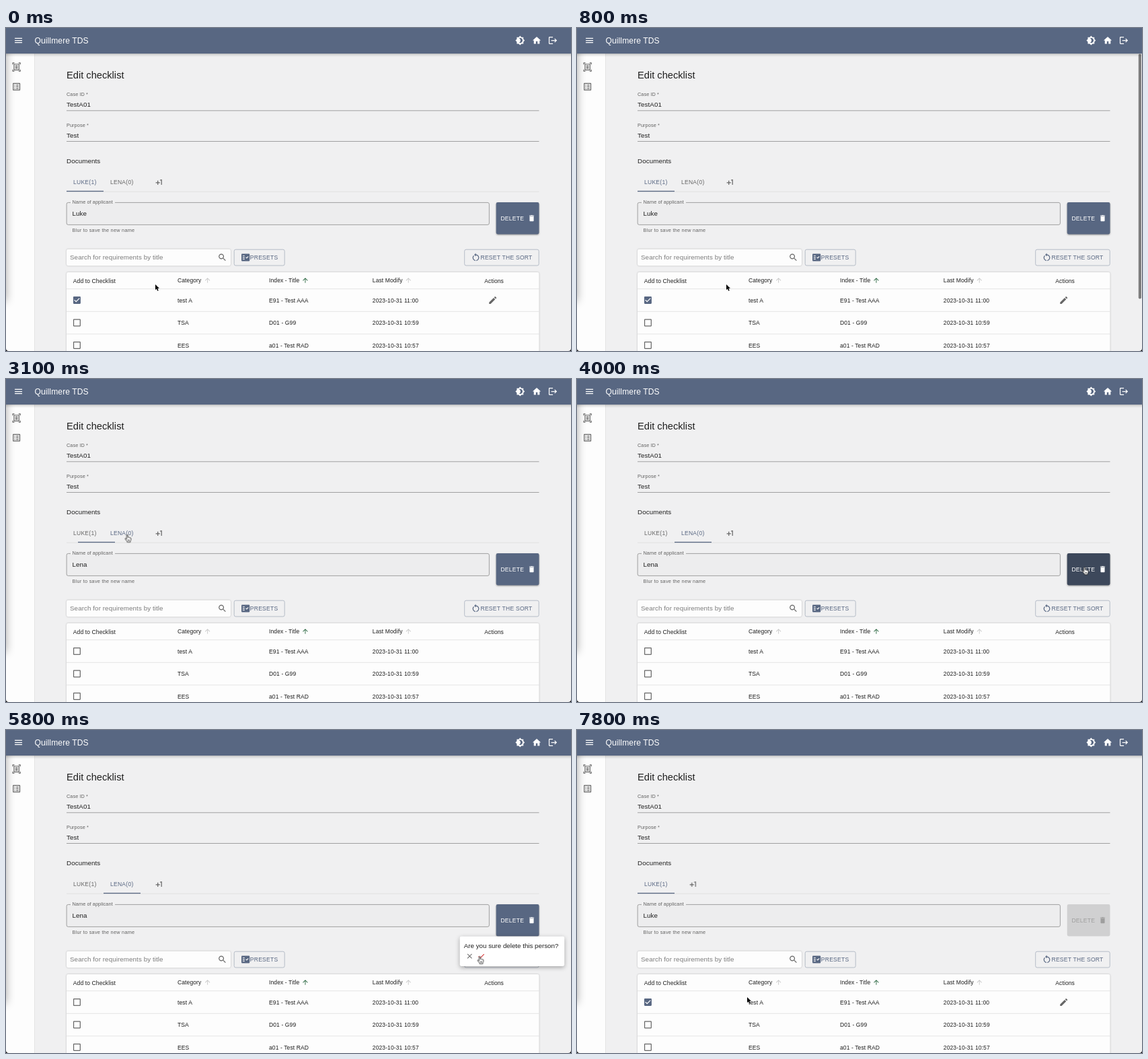
Write an HTML page that moves like this. It is 840 px wide and 480 px high and loops after 8 s.

```html
<!DOCTYPE html>
<html lang="en">
<head>
<meta charset="utf-8">
<title>Edit checklist</title>
<style>
  html, body { margin: 0; width: 100%; height: 100%; overflow: hidden; background: #f0f0f1; }
  svg { display: block; width: 840px; height: 480px; }
  text { font: 9.78px "Liberation Sans", Arial, sans-serif; letter-spacing: .00938em; fill: #1f1f1f; white-space: pre; }
  .h5 text, text.h5 { font-size: 14.67px; letter-spacing: 0; }
  .lab text, text.lab { font-size: 7.33px; fill: #636363; }
  text.help { font-size: 7.33px; letter-spacing: .0333em; fill: #636363; }
  .cell text { font-size: 8.555px; letter-spacing: .0107em; }
  .btn text { font-size: 8.555px; letter-spacing: .02857em; fill: inherit; }
  .blue { fill: #586782; }
  .gray { fill: #666; }
  .white { fill: #fff; }
  .line { stroke: #8c8c8c; stroke-width: .8; fill: none; }
  .rule { stroke: #dfdfdf; stroke-width: .8; }
  .outlined { fill: none; stroke: #a6afbd; stroke-width: .8; }
  .sh1 { filter: drop-shadow(0 .7px .8px rgba(0,0,0,.26)); }
  .sh2 { filter: drop-shadow(0 1px 1.3px rgba(0,0,0,.38)); }
  .sh8 { filter: drop-shadow(0 2px 3px rgba(0,0,0,.32)); }

  /* 8 s loop, 100 ms = 1.25% */
  .scroll, .bar, .thumb, .first, .second, .early, .late, .tab1, .tab2, .ink, .del, .pop, .arrow, .hand {
    animation: 8s step-end infinite;
  }
  .scroll { animation-name: scroll; }
  .bar { animation-name: bar; }
  .thumb { animation-name: thumb; }
  .first { animation-name: first; }
  .second { animation-name: second; }
  .early { animation-name: early; }
  .late { animation-name: late; }
  .tab1 { animation-name: tab1; }
  .tab2 { animation-name: tab2; }
  .ink { animation-name: ink; }
  .del { animation-name: del; }
  .pop { animation-name: pop; }
  .arrow { animation-name: arrow; }
  .hand { animation-name: hand; }
  .cursor { animation: move 8s infinite; }

  @keyframes scroll {
    0% { transform: none; }
    1.25% { transform: translateY(-1px); }
    3.75% { transform: translateY(-6px); }
    5% { transform: translateY(-10px); }
    7.5% { transform: translateY(-5.5px); }
    8.75% { transform: translateY(-2px); }
    10%, 100% { transform: none; }
  }
  @keyframes thumb {
    0% { transform: none; }
    1.25% { transform: translateY(.8px); }
    3.75% { transform: translateY(5px); }
    5% { transform: translateY(8.3px); }
    7.5% { transform: translateY(4.6px); }
    8.75% { transform: translateY(1.7px); }
    10%, 100% { transform: none; }
  }
  @keyframes bar {
    0% { opacity: 0; }
    1.25% { opacity: 1; }
    17.5% { opacity: .5; }
    18.75% { opacity: .08; }
    20%, 100% { opacity: 0; }
  }
  @keyframes first { 0% { opacity: 1; } 38.75% { opacity: 0; } 76.25%, 100% { opacity: 1; } }
  @keyframes second { 0% { opacity: 0; } 38.75% { opacity: 1; } 76.25%, 100% { opacity: 0; } }
  @keyframes early { 0% { opacity: 1; } 76.25%, 100% { opacity: 0; } }
  @keyframes late { 0% { opacity: 0; } 76.25%, 100% { opacity: 1; } }
  @keyframes tab1 { 0% { fill: #586782; } 38.75% { fill: #666; } 76.25%, 100% { fill: #586782; } }
  @keyframes tab2 { 0% { fill: #666; } 38.75%, 100% { fill: #586782; } }
  @keyframes ink {
    0% { transform: none; }
    38.75% { transform: translateX(17px); }
    40% { transform: translateX(46px); }
    41.25% { transform: translateX(54px); }
    42.5% { transform: translateX(55px); }
    76.25% { transform: translateX(38px); }
    77.5% { transform: translateX(9px); }
    78.75% { transform: translateX(1px); }
    80%, 100% { transform: none; }
  }
  @keyframes del {
    0% { fill: #586782; }
    47.5% { fill: #4a576e; }
    48.75% { fill: #3d485b; }
    53.75% { fill: #4a576e; }
    55%, 100% { fill: #586782; }
  }
  @keyframes pop {
    0% { opacity: 0; }
    53.75% { opacity: .35; }
    55% { opacity: .85; }
    56.25% { opacity: 1; }
    76.25% { opacity: .5; }
    77.5% { opacity: .1; }
    78.75%, 100% { opacity: 0; }
  }
  @keyframes hand {
    0% { opacity: 0; } 30% { opacity: 1; } 42.5% { opacity: 0; } 47.5% { opacity: 1; }
    53.75% { opacity: 0; } 71.25% { opacity: 1; } 81.25%, 100% { opacity: 0; }
  }
  @keyframes arrow {
    0% { opacity: 1; } 30% { opacity: 0; } 42.5% { opacity: 1; } 47.5% { opacity: 0; }
    53.75% { opacity: 1; } 71.25% { opacity: 0; } 81.25%, 100% { opacity: 1; }
  }
  @keyframes move {
    0% { transform: translate(222px, 381px); animation-timing-function: step-end; }
    16.25% { transform: translate(222px, 381px); animation-timing-function: steps(2); }
    18.75% { transform: translate(212px, 363px); animation-timing-function: steps(3); }
    22.5% { transform: translate(168px, 319px); animation-timing-function: step-end; }
    25% { transform: translate(168px, 319px); animation-timing-function: steps(4); }
    30% { transform: translate(207px, 233px); animation-timing-function: step-end; }
    31.25% { transform: translate(207px, 233px); animation-timing-function: steps(3); }
    35% { transform: translate(180.5px, 231.5px); animation-timing-function: step-end; }
    38.75% { transform: translate(180.5px, 231.5px); animation-timing-function: steps(2); }
    41.25% { transform: translate(225px, 237px); animation-timing-function: steps(3); }
    45% { transform: translate(600px, 276px); animation-timing-function: steps(3); }
    48.75% { transform: translate(764px, 290px); animation-timing-function: steps(2); }
    51.25% { transform: translate(745.5px, 269.5px); animation-timing-function: step-end; }
    61.25% { transform: translate(745.5px, 269.5px); animation-timing-function: steps(9); }
    72.5% { transform: translate(704.5px, 336.5px); animation-timing-function: step-end; }
    80% { transform: translate(704.5px, 336.5px); animation-timing-function: steps(4); }
    85% { transform: translate(560px, 352px); animation-timing-function: step-end; }
    86.25% { transform: translate(560px, 352px); animation-timing-function: steps(9); }
    97.5%, 100% { transform: translate(253px, 397px); }
  }
</style>
</head>
<body>
<svg viewBox="0 0 840 480">
  <defs>
    <path id="up" d="M4 12l1.41 1.41L11 7.83V20h2V7.83l5.58 5.59L20 12l-8-8z" transform="scale(.47)"/>
    <path id="box" d="M19 5v14H5V5h14m0-2H5c-1.1 0-2 .9-2 2v14c0 1.1.9 2 2 2h14c1.1 0 2-.9 2-2V5c0-1.1-.9-2-2-2z" transform="scale(.611)"/>
    <path id="plus" d="M10 8H8v4H4v2h4v4h2v-4h4v-2h-4zm4.5-1.92V7.9l2.5-.5V18h2V5z" transform="scale(.611)"/>
    <path id="bin" d="M6 19c0 1.1.9 2 2 2h8c1.1 0 2-.9 2-2V7H6zM19 4h-3.5l-1-1h-5l-1 1H5v2h14z" transform="scale(.509)"/>
    <filter id="blur" x="-300%" y="-20%" width="700%" height="140%"><feGaussianBlur stdDeviation="7"/></filter>
  </defs>

  <rect width="840" height="480" fill="#f0f0f1"/>

  <g class="scroll">
    <text class="h5" x="90" y="74.7">Edit checklist</text>
    <g class="lab">
      <text x="90" y="101.2">Case ID *</text>
      <text x="90" y="147">Purpose *</text>
    </g>
    <text x="90" y="116.8">TestA01</text>
    <text x="90" y="162.5">Test</text>
    <path class="line" d="M90 122.8H792.5M90 168.5H792.5"/>
    <text x="90" y="201.3">Documents</text>

    <path class="rule" d="M90 243.3H792.5"/>
    <g class="btn">
      <g class="tab1"><text x="100" y="232.1">LUKE(1)</text></g>
      <g class="early">
        <g class="tab2"><text x="155" y="232.1">LENA(0)</text></g>
        <use href="#plus" x="220.2" y="221.9" class="gray"/>
      </g>
      <use href="#plus" x="165.2" y="221.9" class="gray late"/>
    </g>
    <rect class="ink blue" x="90" y="241.9" width="55" height="1.3"/>

    <rect x="90" y="259.4" width="628.5" height="33" rx="2.4" fill="#ededee"/>
    <path class="line" d="M96 259.4H92.5a2.4 2.4 0 0 0-2.4 2.4V290a2.4 2.4 0 0 0 2.4 2.4H716a2.4 2.4 0 0 0 2.4-2.4V261.8a2.4 2.4 0 0 0-2.4-2.4H162"/>
    <text class="lab" x="98.5" y="261.3">Name of applicant</text>
    <text class="first" x="98.5" y="279.3">Luke</text>
    <text class="second" x="98.5" y="279.3">Lena</text>
    <text class="help" x="98.5" y="302.9">Blur to save the new name</text>

    <g class="early btn white">
      <rect class="del sh2" x="728.7" y="259" width="63.8" height="47.5" rx="2.4"/>
      <text x="735.4" y="285.6">DELETE</text>
      <use href="#bin" x="775.4" y="276.5"/>
    </g>
    <g class="late btn" fill="#9e9e9e">
      <rect x="728.7" y="259" width="63.8" height="47.5" rx="2.4" fill="#d0d0d1"/>
      <text x="735.4" y="285.6">DELETE</text>
      <use href="#bin" x="775.4" y="276.5"/>
    </g>

    <rect class="sh1" x="90" y="328.8" width="244" height="24.4" rx="2.4" fill="#fdfdfd"/>
    <text x="95" y="344.2" style="fill:#7c7c7c">Search for requirements by title</text>
    <path class="gray" transform="translate(314.3 333.6) scale(.611)" d="M15.5 14h-.79l-.28-.27C15.41 12.59 16 11.11 16 9.5 16 5.91 13.09 3 9.5 3S3 5.91 3 9.5 5.91 16 9.5 16c1.61 0 3.09-.59 4.23-1.57l.27.28v.79l5 4.99L20.49 19zm-6 0C7.01 14 5 11.99 5 9.5S7.01 5 9.5 5 14 7.01 14 9.5 11.99 14 9.5 14z"/>
    <g class="btn blue">
      <rect class="outlined" x="339.2" y="329.2" width="75" height="23.8" rx="2.4"/>
      <path fill-rule="evenodd" transform="translate(348.8 333.6) scale(.611)" d="M20 3H4c-1.1 0-2 .9-2 2v14c0 1.1.9 2 2 2h16c1.1 0 2-.9 2-2V5c0-1.1-.9-2-2-2zM10 17H5v-2h5zm0-4H5v-2h5zm0-4H5V7h5zm4.82 6L12 12.16l1.41-1.41 1.41 1.42L17.99 9l1.42 1.42z"/>
      <text x="362.8" y="344">PRESETS</text>
      <rect class="outlined" x="681.7" y="329.2" width="110.5" height="23.8" rx="2.4"/>
      <path transform="translate(691.2 333.4) scale(.611)" d="M12 5V2L8 6l4 4V7c3.31 0 6 2.69 6 6 0 2.97-2.17 5.43-5 5.91v2.02c3.95-.49 7-3.85 7-7.93 0-4.42-3.58-8-8-8zM6 13c0-1.65.67-3.15 1.76-4.24L6.34 7.34C4.9 8.79 4 10.79 4 13c0 4.08 3.05 7.44 7 7.93v-2.02c-2.83-.48-5-2.94-5-5.91z"/>
      <text x="705.5" y="344">RESET THE SORT</text>
    </g>

    <rect class="sh1" x="90" y="363" width="702.5" height="150" rx="2.4" fill="#fdfdfd"/>
    <path class="rule" d="M90 387.7H792.5M90 421.3H792.5M90 454.8H792.5M90 488.4H792.5"/>
    <g class="cell">
      <text x="99.8" y="378.8">Add to Checklist</text>
      <text x="255" y="377.8">Category</text>
      <text x="391" y="377.8">Index - Title</text>
      <text x="544.8" y="377.8">Last Modify</text>
      <text x="711.3" y="378.8">Actions</text>
      <text x="255" y="407.7">test A</text>
      <text x="391" y="407.7">E91 - Test AAA</text>
      <text x="544.8" y="407.7">2023-10-31 11:00</text>
      <text x="255" y="441.1">TSA</text>
      <text x="391" y="441.1">D01 - G99</text>
      <text x="544.8" y="441.1">2023-10-31 10:59</text>
      <text x="255" y="474.7">EES</text>
      <text x="391" y="474.7">a01 - Test RAD</text>
      <text x="544.8" y="474.7">2023-10-31 10:57</text>
    </g>
    <use href="#up" x="294" y="369.4" fill="#cacaca"/>
    <use href="#up" x="439.3" y="369.4" fill="#2f6b45"/>
    <use href="#up" x="592.6" y="369.4" fill="#cacaca"/>
    <g class="first">
      <path class="blue" transform="translate(98.1 397.2) scale(.611)" d="M19 3H5c-1.11 0-2 .9-2 2v14c0 1.1.89 2 2 2h14c1.11 0 2-.9 2-2V5c0-1.1-.89-2-2-2zm-9 14l-5-5 1.41-1.41L10 14.17l7.59-7.59L19 8z"/>
      <path class="gray" transform="translate(716.4 397.2) scale(.611)" d="M3 17.25V21h3.75L17.81 9.94l-3.75-3.75zM20.71 7.04c.39-.39.39-1.02 0-1.41l-2.34-2.34a1 1 0 0 0-1.41 0l-1.83 1.83 3.75 3.75z"/>
    </g>
    <use href="#box" x="98.1" y="397.2" class="gray second"/>
    <use href="#box" x="98.1" y="430.6" class="gray"/>
    <use href="#box" x="98.1" y="464.2" class="gray"/>
  </g>

  <g class="bar"><rect class="thumb" x="834.8" y="38.5" width="4.2" height="364" rx="2.1" fill="#7d7d7d"/></g>

  <rect y="38" width="42.5" height="442" fill="#fdfdfd"/>
  <path d="M42.6 38V480" stroke="#dcdcdc" stroke-width=".8"/>
  <rect x="-30" y="20" width="30" height="386" opacity=".34" filter="url(#blur)"/>
  <g class="gray">
    <path fill-rule="evenodd" transform="translate(8.3 50.7) scale(.611)" d="M7 3H4v3H2V1h5zm15 3V1h-5v2h3v3zM7 21H4v-3H2v5h5zm13-3v3h-3v2h5v-5zM19 18c0 1.1-.9 2-2 2H7c-1.1 0-2-.9-2-2V6c0-1.1.9-2 2-2h10c1.1 0 2 .9 2 2zM17 6H7v12h10zM15 8H9v2h6zm0 3H9v2h6zm0 3H9v2h6z"/>
    <path transform="translate(8.3 80) scale(.611)" d="M19 5v14H5V5h14m1.1-2H3.9c-.5 0-.9.4-.9.9v16.2c0 .4.4.9.9.9h16.2c.4 0 .9-.5.9-.9V3.9c0-.5-.5-.9-.9-.9zM11 7h6v2h-6zm0 4h6v2h-6zm0 4h6v2h-6zM7 7h2v2H7zm0 4h2v2H7zm0 4h2v2H7z"/>
  </g>

  <rect class="blue" x="-8" y="-8" width="856" height="46" style="filter:drop-shadow(0 1.5px 2px rgba(0,0,0,.3))"/>
  <g class="white">
    <path transform="translate(11.2 11.2) scale(.611)" d="M3 18h18v-2H3zm0-5h18v-2H3zm0-7v2h18V6z"/>
    <text x="42.5" y="22.8" style="font-size:12.1px;letter-spacing:.0075em;fill:#fff">Quillmere TDS</text>
    <path transform="translate(757 11.2) scale(.611)" d="M20 8.69V4h-4.69L12 .69 8.69 4H4v4.69L.69 12 4 15.31V20h4.69L12 23.31 15.31 20H20v-4.69L23.31 12zM12 18c-.89 0-1.74-.2-2.5-.55C11.56 16.5 13 14.42 13 12s-1.44-4.5-3.5-5.45C10.26 6.2 11.11 6 12 6c3.31 0 6 2.69 6 6s-2.69 6-6 6z"/>
    <path transform="translate(781.7 11.2) scale(.611)" d="M10 20v-6h4v6h5v-8h3L12 3 2 12h3v8z"/>
    <path transform="translate(805.7 11.2) scale(.611)" d="M17 7l-1.41 1.41L18.17 11H8v2h10.17l-2.58 2.58L17 17l5-5zM4 5h8V3H4c-1.1 0-2 .9-2 2v14c0 1.1.9 2 2 2h8v-2H4z"/>
  </g>

  <g class="pop">
    <rect class="sh8 white" x="674.7" y="306.7" width="155.5" height="44.2" rx="2.4"/>
    <text x="680.8" y="324" style="letter-spacing:0">Are you sure delete this person?</text>
    <path class="gray" transform="translate(683.2 330) scale(.509)" d="M19 6.41 17.59 5 12 10.59 6.41 5 5 6.41 10.59 12 5 17.59 6.41 19 12 13.41 17.59 19 19 17.59 13.41 12z"/>
    <path fill="#d32f2f" transform="translate(700.4 330) scale(.509)" d="M9 16.17 4.83 12l-1.42 1.41L9 19 21 7l-1.41-1.41z"/>
  </g>

  <g class="cursor" stroke-linejoin="round">
    <path class="arrow" d="M0 0V8.3L1.9 6.6 3.2 9.7 4.7 9.1 3.4 6H6z" fill="#000" stroke="#fff" stroke-width=".8" paint-order="stroke"/>
    <path class="hand" d="M-1.1 6.6V.9Q-1.1 0-.2 0T.8 .9V4Q1.7 3.3 2.4 4.2 3.3 3.7 3.9 4.6 5.4 4.2 5.4 5.8 5.5 8 4.4 9.5V10.9H-.4V9.8Q-2.2 8-3.3 6.3-3.6 5.2-2.5 5.3-1.8 5.6-1.1 6.6zM1 7.2V9.2M2.5 7.2V9.2" fill="#fff" stroke="#111" stroke-width=".8"/>
  </g>

  <path d="M0 480v-4a4 4 0 0 0 4 4zM840 480v-4a4 4 0 0 1-4 4z" fill="#000"/>
</svg>
</body>
</html>
```
